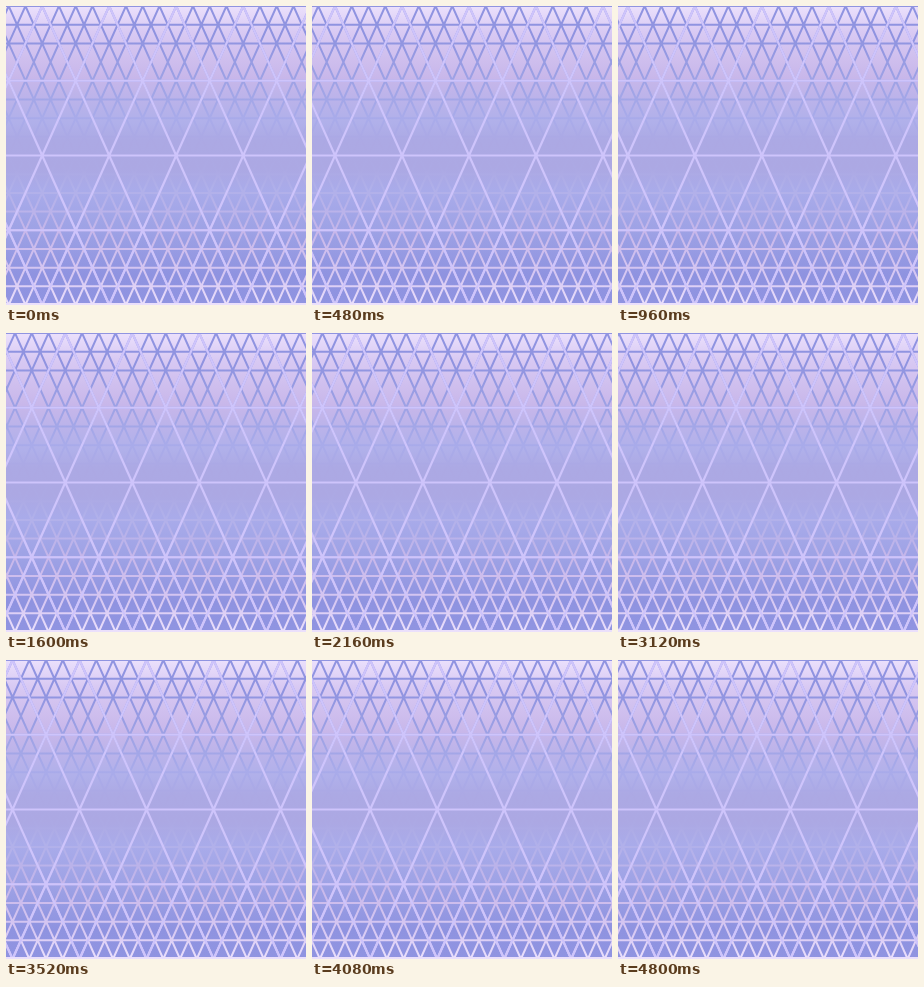
Animation, 300 px wide and 299 px high, one loop 4880 ms. Source, as an HTML page with a canvas:

```html
<!DOCTYPE html>
<html lang="en">
<head>
<meta charset="utf-8">
<style>
  html, body { margin: 0; width: 100%; height: 100%; overflow: hidden; background: #aca8e4; }
  canvas { display: block; }
</style>
</head>
<body>
<canvas id="stage" width="300" height="299"></canvas>
<script>
const W = 300, H = 299, MID = H / 2;
const LOOP = 4880, STEP = 80;
const BIG = 67, SMALL = BIG / 4, START = 36.2;
const ROW = H / 16, OPEN_ROW = -5;
const ctx = document.getElementById('stage').getContext('2d');

const stops = [
  [0, '#ebe0fc'], [0.09, '#d8c9f3'], [0.24, '#c8b7ea'], [0.31, '#bbb3ea'],
  [0.39, '#b0b0ea'], [0.45, '#aca9e4'], [0.54, '#aca8e3'],
  [0.62, '#a9abea'], [0.75, '#9ea2e5'], [0.9, '#8f93e0'], [1, '#9094e1']
];

function gradient(flip) {
  const g = ctx.createLinearGradient(0, flip ? H : 0, 0, flip ? 0 : H);
  for (const [at, color] of stops) g.addColorStop(at, color);
  return g;
}

const back = gradient(false), front = gradient(true);

// Diagonals in both directions through vertices spaced by `pitch` on the middle row.
function diagonals(x0, pitch) {
  const lean = 2 * BIG / 2;
  const first = x0 - Math.ceil((x0 + lean) / pitch) * pitch;
  for (let x = first; x < W + lean + pitch; x += pitch) {
    ctx.moveTo(x - lean, 0);
    ctx.lineTo(x + lean, H);
    ctx.moveTo(x + lean, 0);
    ctx.lineTo(x - lean, H);
  }
}

function lattice(x0, pitch, every, color, width) {
  ctx.strokeStyle = color;
  ctx.lineWidth = width;
  ctx.beginPath();
  for (let k = -8; k <= 8; k += every) {
    if (k === OPEN_ROW) continue;
    const y = MID + k * ROW;
    ctx.moveTo(0, y);
    ctx.lineTo(W, y);
  }
  diagonals(x0, pitch);
  ctx.stroke();
}

function draw(now) {
  const t = Math.floor((now % LOOP) / STEP) * STEP;
  const x = START - 2 * BIG * t / LOOP;
  ctx.fillStyle = back;
  ctx.fillRect(0, 0, W, H);
  lattice(x, SMALL, 1, front, 2);
  lattice(x, BIG, 4, '#cec4fb', 2.2);
  ctx.fillStyle = front;
  ctx.fillRect(0, 0, W, 1);
  ctx.fillRect(0, H - 2, W, 2);
}

let origin;
function tick(now) {
  origin ??= now;
  draw(now - origin);
  requestAnimationFrame(tick);
}
draw(0);
requestAnimationFrame(tick);
</script>
</body>
</html>
```
